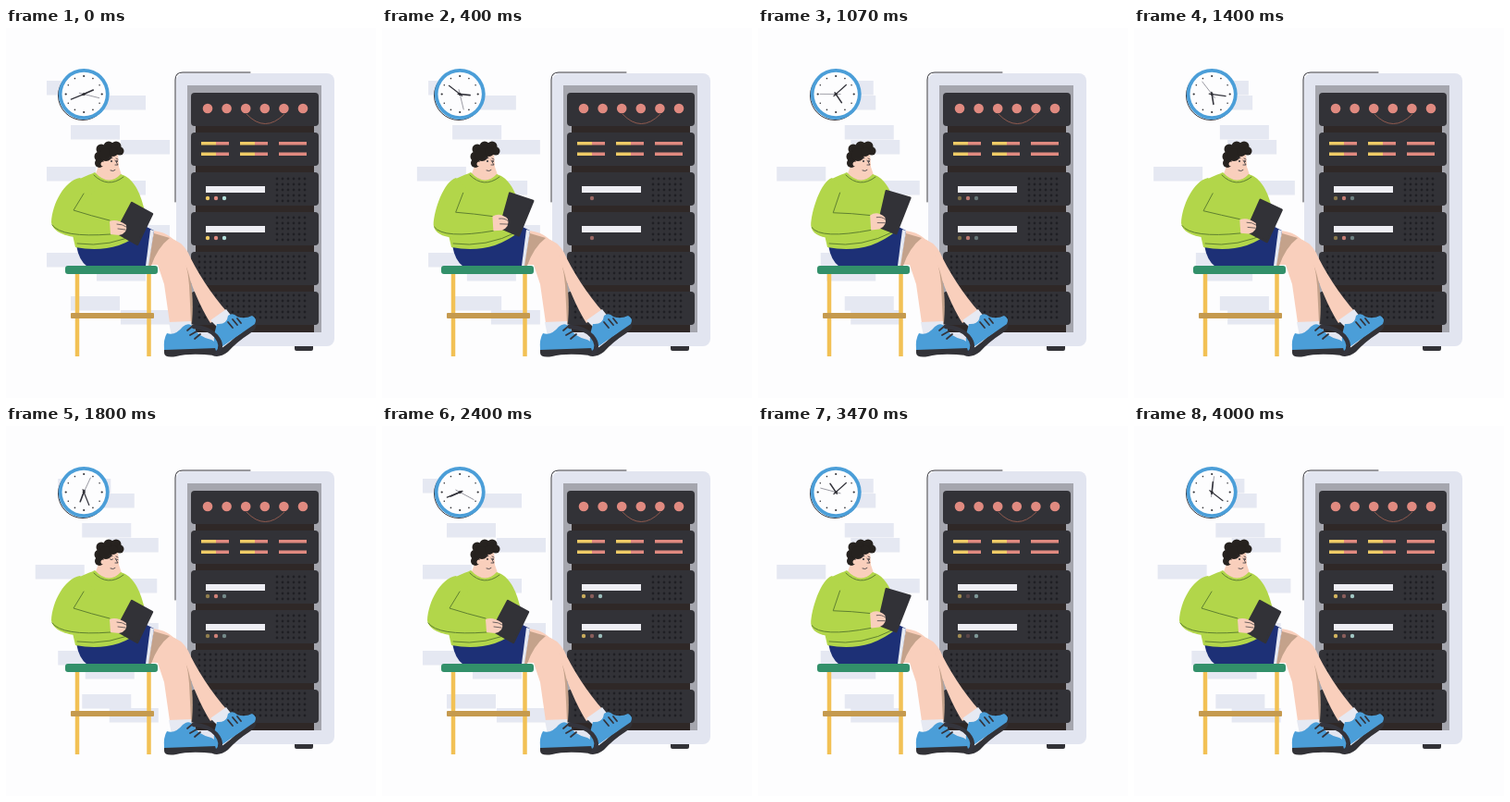
Animation, 400 px wide and 400 px high, one loop 4070 ms. Source, as an HTML page:

```html
<!DOCTYPE html>
<html lang="en">
<head>
<meta charset="utf-8">
<title>Server room</title>
<style>
html, body { margin: 0; width: 100%; height: 100%; overflow: hidden; background: #fdfdfe; }
svg { display: block; width: 100vw; height: 100vh; }
.dark { fill: #323237; }
.skin { fill: #f9cfbc; }
.blue { fill: #4b9ed8; }
.line { fill: none; stroke: #34343c; stroke-width: 1; stroke-linecap: round; stroke-linejoin: round; }
.knit { fill: #b2d64a; }
.fold { fill: none; stroke: #5f8030; stroke-width: 1; stroke-linecap: round; }
</style>
</head>
<body>
<svg viewBox="0 0 400 400">
  <defs>
    <pattern id="vents" x="206" y="160" width="6" height="6" patternUnits="userSpaceOnUse">
      <circle cx="3" cy="3" r="1.4" fill="#1f1f24"/>
    </pattern>
  </defs>

  <g id="bricks" fill="#e5e8f2"></g>

  <g id="clock">
    <circle class="line" cx="83" cy="73" r="26.500"/>
    <circle cx="84.200" cy="71.500" r="27.500" class="blue"/>
    <circle cx="84.200" cy="71.500" r="23.700" fill="#fdfdfe"/>
    <g id="ticks" class="dark"></g>
    <g transform="translate(84.200 71.500)" stroke="#34343c" stroke-linecap="round">
      <path id="second" d="M0 5V-17" stroke="#8c8c96" stroke-width=".8"/>
      <path id="minute" d="M0 3V-15" stroke-width="1.2"/>
      <path id="hour" d="M0 2V-11" stroke-width="1.6"/>
      <circle r="1.500" class="dark" stroke="none"/>
    </g>
  </g>

  <g id="cabinet">
    <rect class="dark" x="312" y="341" width="20" height="8" rx="2"/>
    <rect x="184" y="49" width="171" height="295" rx="8" fill="#e2e5f0"/>
    <path class="line" d="M183 188V56Q183 48 191 48H264"/>
    <rect x="196" y="62" width="145" height="267" fill="#a5a6ae"/>
    <rect x="205" y="74" width="128" height="255" fill="#2f2827"/>
    <g id="units"></g>
    <path d="M260 93Q280 114 301 93" fill="none" stroke="#8f5a4e"/>
  </g>

  <g id="stool">
    <path d="M77 264V355M154.500 264V355" stroke="#f2c155" stroke-width="4.500"/>
    <rect x="70" y="308" width="90" height="6" rx="1" fill="#c59a4e"/>
  </g>

  <g id="legs">
    <path class="skin" d="M176 227Q190 230 197 243C205 261 222 288 239 307L221 319C212 304 206 292 195 262Z"/>
    <path d="M194 256L196 261Q204 284 201 319L199 318Z" fill="#c4a28b"/>
    <path class="skin" d="M157 219Q177 220 187 236Q196 252 198 278L200 319H177L171 277L164 256H150Z"/>
    <path d="M160 222L177 227Q164 237 157 257H152Z" fill="#c4a28b"/>
    <path d="M176 318L200 317L201 330L179 333ZM221 316L238 304L245 313L229 324Z" fill="#e6e9f2"/>
    <path d="M76 235Q112 234 150 214L160 219L153 258H88Q79 252 76 235Z" fill="#1d3076"/>
    <path d="M156 218L160 219L154 257L151 257Z" fill="#e6e9f2"/>
  </g>
  <rect x="64" y="257" width="100" height="9" rx="3" fill="#32906a"/>

  <g id="shoes">
    <path class="dark" d="M171 345L228 343Q233 349 225 354Q199 351 184 355Q171 357 171 351Z"/>
    <path class="blue" d="M174 330Q183 333 191 323Q198 317 203 324Q208 334 222 337Q230 341 228 346L171 348Q170 336 174 330Z"/>
    <path class="dark" d="M223 352Q238 344 248 334L270 319Q272 325 264 330Q250 339 240 350Q231 357 223 354Z"/>
    <path class="blue" d="M228 320Q239 321 240 311Q245 307 250 312Q258 315 266 311Q272 314 269 320L227 349Q222 338 228 320Z"/>
    <path class="line" stroke-width="4.500" style="stroke-width:4.500px" d="M203 323Q219 324 227 333Q236 344 228 352"/>
    <path class="line" style="stroke-width:1.800px" d="M196 327L202 322M199 332L206 328M204 336L210 331M240 318L245 324M245 315L250 321M250 314L254 319"/>
  </g>

  <g id="body">
    <path class="skin" d="M102 144H120L126 162Q110 172 96 160Z"/>
    <path class="knit" d="M96 156C88 160 80 161 74 168C68 182 67 200 70 215L75 237Q100 242 122 235Q138 229 150 219L149 194C145 178 138 162 124 158Q111 172 96 156Z"/>
    <path class="fold" d="M95 159Q110 174 127 161M77 233Q112 238 147 220"/>
    <path id="arm" class="knit"/>
    <path id="fold" class="fold"/>
    <path id="tablet" class="dark" stroke="#323237" stroke-width="2.500" stroke-linejoin="round"/>
    <path id="hand" class="skin"/>
    <path id="fingers" class="line" style="stroke-width:.7px"/>
  </g>

  <g id="head">
    <path class="skin" d="M102 138Q112 130 121 136L122 148Q123 159 115 161Q105 161 101 151Z"/>
    <g id="curls" fill="#26221f"></g>
    <circle class="skin" cx="105" cy="147" r="2.500"/>
    <path class="line" style="stroke-width:.8px" d="M112 141L115 140.500M119 141L121 142M118 143L121 148L118 148M113 154Q116 155.500 118 153.500"/>
    <g id="open" class="dark"><circle cx="114" cy="144" r="1"/><circle cx="120" cy="144" r=".9"/></g>
    <path id="shut" class="line" style="stroke-width:.8px" d="M112.500 144Q114 145.500 115.500 144M119 144L121 144.500"/>
  </g>
</svg>

<script>
const $ = id => document.getElementById(id);
const NS = 'http://www.w3.org/2000/svg';
const LOOP = 4070, CYCLE = 2400, FPS = 15;

function add(parent, tag, attrs) {
  const el = document.createElementNS(NS, tag);
  for (const key in attrs) el.setAttribute(key, attrs[key]);
  return $(parent).appendChild(el);
}
const box = (parent, x, y, width, height, fill, rx = 0) =>
  add(parent, 'rect', { x, y, width, height, fill, rx });
const dot = (parent, cx, cy, r, fill) =>
  add(parent, 'circle', fill ? { cx, cy, r, fill } : { cx, cy, r });

// Wall bricks: x, y, direction of drift
const bricks = [
  [44, 57, 1], [98, 73, -1], [70, 105, 1], [124, 121, -1],
  [44, 150, -1], [98, 165, 1], [124, 213, -1], [44, 243, 1],
  [98, 258, -1], [70, 290, 1], [124, 305, -1]
].map(([x, y, dir]) => ({
  el: add('bricks', 'rect', { x, y, width: y === 57 ? 57 : 53, height: 15.5 }), dir
}));

for (let i = 0; i < 12; i++) {
  const a = i * Math.PI / 6;
  dot('ticks', 84.2 + 19.5 * Math.sin(a), 71.5 - 19.5 * Math.cos(a), i % 3 ? .8 : 1.1);
}

// Server units
const YELLOW = '#efcb66', SALMON = '#e08a80', MINT = '#b5e0dc';
const lamps = [];
for (let i = 0; i < 6; i++) box('units', 200, 70 + i * 43, 138, 36, '#323237', 4);
for (let i = 0; i < 6; i++) dot('units', 218 + i * 20.6, 87, 5.3, SALMON);
for (let i = 0; i < 3; i++) {
  for (const y of [123, 134.5]) {
    box('units', 211 + i * 42, y, 16, 3.5, i < 2 ? YELLOW : SALMON);
    box('units', 227 + i * 42, y, 14, 3.5, SALMON);
  }
}
for (const y of [156, 199]) {
  box('units', 216, y + 15, 64, 7, '#eeeef4');
  box('units', 290, y + 4, 36, 30, 'url(#vents)');
  [YELLOW, SALMON, MINT].forEach((color, i) =>
    lamps.push({ el: dot('units', 218 + i * 9, y + 28, 2.2, color), mid: i === 1 }));
}
for (const y of [244, 286]) box('units', 206, y, 120, 30, 'url(#vents)');

for (const [x, y, r] of [[103, 131, 5.5], [111, 128, 5.5], [119, 128, 5.5], [123, 133, 4.5],
  [101, 139, 5.5], [101, 146, 5], [108, 137, 7], [116, 134, 5]])
  dot('curls', x, y, r);

// Two poses of each moving part of the reader
const poses = {
  arm: ['M80 162C63 165 50 190 49 210C50 219 62 225 76 226Q98 228 114 223L112 208Q92 204 75 197L96 176Z',
        'M80 162C68 166 58 200 58 214C59 222 66 226 78 227Q104 227 124 218L122 202Q102 203 82 201L94 176Z'],
  fold: ['M84 179L73 197Q92 203 112 208M50 213Q60 227 113 223',
         'M89 178L82 200Q102 200 122 202M59 216Q68 229 123 218'],
  tablet: ['M136 189L158 201L142 234L119 221Z',
           'M139 175L165 182L150 221L131 214Z'],
  hand: ['M112 209Q120 206 130 213Q132 222 122 224L113 223Z',
         'M122 202Q130 196 138 204Q141 213 132 217L123 218Z'],
  fingers: ['M120 212Q126 212 130 215M121 217L129 218',
            'M129 204Q135 203 138 206M130 210L138 210']
};

function blend([from, to], k) {
  const ends = to.match(/[\d.]+/g);
  let i = 0;
  return from.replace(/[\d.]+/g, n => +n + (ends[i++] - n) * k);
}

const smooth = (a, b, t) => {
  const k = Math.min(1, Math.max(0, (t - a) / (b - a)));
  return k * k * (3 - 2 * k);
};

// Lamp brightness over the loop
const marks = [0, 400, 1070, 1800, 2400, 3000, 4000, 4070];
const glow = {
  outer: [1, 0, .4, .5, .8, .35, .85, .9],
  mid: [1, .6, .8, .9, .5, 0, .5, .6]
};
function level(values, t) {
  const i = Math.max(0, marks.findIndex(m => m > t) - 1);
  return values[i] + (values[i + 1] - values[i]) * (t - marks[i]) / (marks[i + 1] - marks[i]);
}

const turn = (id, deg) => $(id).setAttribute('transform', `rotate(${deg})`);

function draw(t) {
  const drift = 12.25 * (1 - Math.cos(2 * Math.PI * t / CYCLE));
  for (const { el, dir } of bricks) el.setAttribute('transform', `translate(${dir * drift} 0)`);

  turn('minute', 248 + t * .15);
  turn('hour', 66 + t * .075);
  turn('second', 104 + t * .156);

  for (const { el, mid } of lamps) el.setAttribute('opacity', level(mid ? glow.mid : glow.outer, t));

  const u = t % CYCLE;
  const lift = smooth(0, 600, u) - smooth(950, 1600, u);
  for (const id in poses) $(id).setAttribute('d', blend(poses[id], lift));

  const blink = t > 1720 && t < 1900;
  $('open').style.display = blink ? 'none' : '';
  $('shut').style.display = blink ? '' : 'none';
}

const start = performance.now();
function tick() {
  const t = (performance.now() - start) % LOOP;
  draw(Math.min(60, Math.floor((t + 4) * FPS / 1000)) * 1000 / FPS);
  requestAnimationFrame(tick);
}
tick();
</script>
</body>
</html>
```
